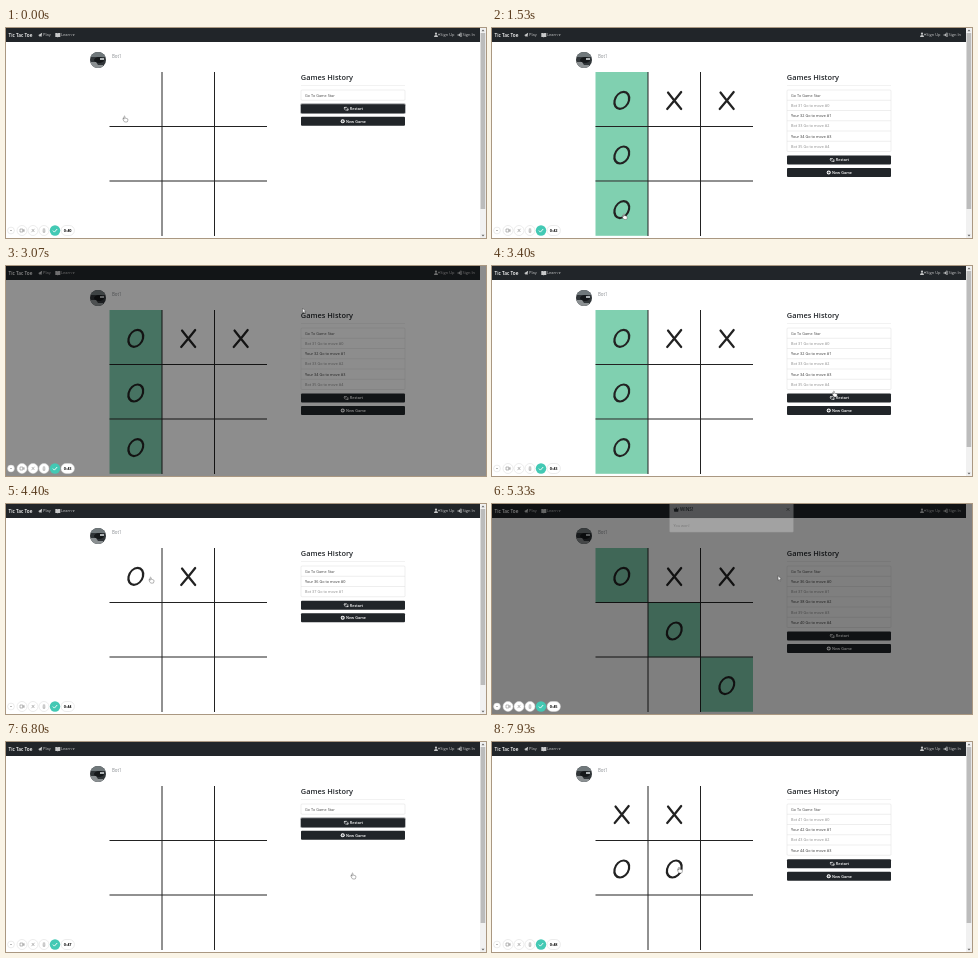
These frames come from a looping animation (480x210 px, 8000 ms). An HTML page:

```html
<!DOCTYPE html>
<html lang="en">
<head>
<meta charset="utf-8">
<title>Tic Tac Toe</title>
<style>
html, body { margin: 0; width: 100%; height: 100%; overflow: hidden; background: #fff; }
svg { display: block; width: 480px; height: 210px; }
text { font: 4px "Open Sans", "Noto Sans", sans-serif; fill: #333; }
.brand { font-size: 4.7px; font-weight: 600; fill: #fff; }
.nav text { fill: #c8c9ca; }
.nav .brand { fill: #fff; }
.title { font-size: 7.4px; font-weight: 600; fill: #212529; }
.btn text { fill: #fff; font-weight: 600; font-size: 3.8px; }
.row text { font-size: 3.8px; }
</style>
</head>
<body>
<svg viewBox="0 0 480 210">
  <rect width="480" height="210" fill="#fff"/>
  <g class="nav">
    <rect width="474" height="14" fill="#212529"/>
    <text class="brand" x="2.5" y="8.8">Tic Tac Toe</text>
    <path d="M32 7.2L36.2 4.8L35.4 9L33.8 8L33.4 9.2L33.1 7.6Z" fill="#c8c9ca"/>
    <text x="37" y="8.4">Play</text>
    <path d="M49.3 5h2l.5.4.5-.4h2v4h-2l-.5.4-.5-.4h-2z" fill="#c8c9ca"/>
    <text x="55" y="8.4">Learn</text>
    <path d="M66.4 6.5h2.4l-1.2 1.3z" fill="#c8c9ca"/>
    <g fill="#c8c9ca">
      <circle cx="430" cy="5.7" r="1.1"/><path d="M428 9q0-2 2-2t2 2zM432 6.2h2v.6h-2zM432.7 5.5h.6v2h-.6z"/>
      <path d="M451.5 6.4h1.7v-1.2l1.8 1.7-1.8 1.7v-1.2h-1.7zM454 4.8h1.5v4.2h-1.5v-.6h.9v-3h-.9z"/>
    </g>
    <text x="434.3" y="8.4">Sign Up</text>
    <text x="456.5" y="8.4">Sign In</text>
  </g>

  <clipPath id="round"><circle cx="92" cy="32" r="8"/></clipPath>
  <g clip-path="url(#round)">
    <rect x="84" y="24" width="16" height="16" fill="#303538"/>
    <rect x="84" y="24" width="16" height="5" fill="#70787b"/>
    <ellipse cx="93" cy="32" rx="5" ry="3" fill="#15181a"/>
    <path d="M85 34h5l2 3h5v3H85z" fill="#8b9092"/>
    <path d="M94 30h4v2h-4z" fill="#aeb3b5"/>
  </g>
  <text x="106" y="29.5" style="font-size:4.4px;fill:#85898d">Bot1</text>

  <g id="cells"></g>
  <path d="M156 44V208M208.5 44V208M103.5 98.5H261M103.5 153H261" stroke="#222" fill="none"/>

  <text class="title" x="294.8" y="51.8">Games History</text>
  <path d="M295 57.5H399" stroke="#ddd" stroke-width=".4"/>
  <rect id="list" x="295" y="62" width="104" fill="#fff" stroke="#d5d5d5" stroke-width=".4" rx="1"/>
  <g id="rows"></g>
  <g id="buttons" class="btn">
    <rect id="focus" x="294.2" y="-.8" width="105.6" height="10.6" rx="1.6" fill="#a6a8aa"/>
    <rect x="295" width="104" height="9" rx="1" fill="#212529"/>
    <path d="M338.7 5.6V3.2H341M341.8 3.6V6H339.4M337.9 4L338.7 3L339.5 4M341 5.2L341.8 6.2L342.6 5.2" fill="none" stroke="#fff" stroke-width=".6"/>
    <text x="343.8" y="6">Restart</text>
    <rect x="295" y="12.6" width="104" height="9" rx="1" fill="#212529"/>
    <circle cx="336.7" cy="17.1" r="2" fill="#fff"/>
    <path d="M335.5 17.1h2.4M336.7 15.9v2.4" stroke="#212529" stroke-width=".6"/>
    <text x="340" y="18.5">New Game</text>
  </g>

  <g id="bar">
    <rect x="474" width="6" height="210" fill="#f1f1f1"/>
    <rect x="474.6" y="5" width="4.6" height="176" fill="#bcbcbc"/>
    <path d="M475.5 3.2h3L477 1.4zM475.5 206.8h3L477 208.6z" fill="#666"/>
  </g>

  <rect id="shade" width="480" height="210"/>
  <g id="modal">
    <rect x="177.5" y="7" width="124" height="31" rx="1" fill="#fff" stroke="#999" stroke-width=".3"/>
    <path d="M177.5 24H301.5" stroke="#ccc" stroke-width=".4"/>
    <path d="M181.7 13.5L183 15L184.2 12.8L185.4 15L186.7 13.5L186.2 17.6H182.2Z" fill="#212529"/>
    <text x="188" y="17.2" style="font-size:4.6px;font-weight:600;fill:#212529">WINS!</text>
    <rect id="ring" x="291.8" y="10.8" width="8.4" height="8.4" rx="1" fill="none" stroke="#b9d3fb" stroke-width=".9"/>
    <path d="M294.6 13.8L297.4 16.6M297.4 13.8L294.6 16.6" stroke="#555" stroke-width=".7"/>
    <text x="181.5" y="32.4" style="font-size:3.8px;fill:#666">You won!</text>
  </g>

  <g id="tools">
    <g fill="#fff" stroke="#d9d9d9" stroke-width=".5">
      <circle cx="5" cy="202.5" r="3.4"/>
      <circle cx="16" cy="202.5" r="5"/><circle cx="27" cy="202.5" r="5"/><circle cx="38" cy="202.5" r="5"/>
      <rect x="55" y="197.5" width="13.4" height="10" rx="5"/>
    </g>
    <circle cx="49" cy="202.5" r="5.2" fill="#43c9b4"/>
    <path d="M46.9 202.6L48.4 204.1L51.2 201" fill="none" stroke="#fff" stroke-width=".9"/>
    <path d="M4 202.5h2M14 201h2.8v3H14zM16.8 202.5l1.4-1v2zM25.5 204.2l3-3.4M25.8 201l2.6 3M36.9 201h2.2M37.2 201.5v2.8h1.6v-2.8" fill="none" stroke="#8a8a8a" stroke-width=".6"/>
    <text id="clock" x="61.7" y="203.9" text-anchor="middle" style="font-size:3.9px;font-weight:700;fill:#111"></text>
  </g>
  <path id="arrow" d="M0 0V4.6L1.1 3.7L1.9 5.3L2.6 5L1.9 3.4H3.3Z" fill="#fff" stroke="#222" stroke-width=".35"/>
  <path id="hand" d="M0 .5Q.5-.4 1 .5V2.3Q1.7 1.8 2 2.5Q2.7 2.1 3 2.8Q3.8 2.6 3.8 3.4V4.7L3.2 6H.6L-.9 3.9Q-1-.1 0 3.2Z" fill="#fff" stroke="#444" stroke-width=".4"/>
</svg>
<script>
const LOOP = 8000;
const NS = "http://www.w3.org/2000/svg";
const $ = id => document.getElementById(id);
const clamp = v => Math.max(0, Math.min(1, v));

function add(parent, tag, attrs) {
  const el = document.createElementNS(NS, tag);
  for (const k in attrs) el.setAttribute(k, attrs[k]);
  return parent.appendChild(el);
}

// Moves are [time, cell]; the player's O always opens.
const games = [
  { start: 0, first: 31, moves: [[430, 0], [590, 1], [1000, 3], [1080, 2], [1400, 6]],
    line: [0, 3, 6], shade: 1740, show: 1890, ring: 2730, hide: 2905 },
  { start: 3730, first: 36, moves: [[4200, 0], [4290, 1], [4640, 4], [4740, 2], [4990, 8]],
    line: [0, 4, 8], shade: 5140, show: 5290, ring: 5870, hide: 6020 },
  { start: 6800, first: 41, moves: [[7260, 3], [7360, 0], [7700, 4], [7790, 1]], line: [] }
];

// Pointer stops: time, x, y
const path = [
  [0, 118, 88], [65, 118, 88], [130, 122, 85], [270, 122, 85], [420, 128, 76], [850, 128, 76],
  [1000, 126, 133], [1130, 126, 133], [1370, 130, 186], [1500, 130, 186], [1930, 249, 121.5],
  [2390, 295, 13], [2910, 295, 13], [3070, 296.5, 42], [3480, 345, 131], [3750, 345, 131],
  [4180, 136, 74], [4400, 144, 73], [4620, 184, 126], [4700, 184, 126], [4960, 236, 180],
  [5050, 236, 180], [5330, 286, 72], [5700, 295, 13], [6030, 295, 13], [6200, 339.5, 110],
  [6460, 346, 131], [6830, 346, 131], [7240, 132, 124], [7450, 132, 124], [7680, 186.5, 125],
  [8000, 186.5, 125]
];

const cells = Array.from({ length: 9 }, (_, i) => {
  const c = i % 3, r = Math.floor(i / 3);
  const g = add($("cells"), "g", { transform: `translate(${103.5 + c * 52.5} ${44 + r * 54.6})` });
  const ink = { fill: "none", stroke: "#222", "stroke-width": 2.2, "stroke-linecap": "round" };
  return {
    bg: add(g, "rect", { width: 52.5, height: 54.6, fill: "#80d0b0" }),
    O: add(g, "ellipse", { ...ink, rx: 7.2, ry: 8.5, transform: "translate(26.3 28.4) skewX(-12)" }),
    X: add(g, "path", { ...ink, d: "M20 20.5Q25 27 33.2 37M33.2 20Q27 28 19.2 37" })
  };
});

const rows = Array.from({ length: 6 }, (_, i) => {
  const g = add($("rows"), "g", { class: "row" });
  const y = 62 + i * 10.25;
  if (i) add(g, "path", { d: `M295 ${y}H399`, stroke: "#d5d5d5", "stroke-width": .4 });
  return { g, label: add(g, "text", { x: 299, y: y + 6.5 }) };
});

const show = (el, on) => el.setAttribute("visibility", on ? "visible" : "hidden");

// Tangent at a stop; zero where the pointer rests on either side.
function slope(i, k) {
  const a = path[i - 1], b = path[i], c = path[i + 1];
  if (!a || !c) return 0;
  const still = (p, q) => p[1] === q[1] && p[2] === q[2];
  return still(a, b) || still(b, c) ? 0 : (c[k] - a[k]) / (c[0] - a[0]);
}

function pointer(t) {
  let i = 0;
  while (i < path.length - 2 && t >= path[i + 1][0]) i++;
  const a = path[i], b = path[i + 1], d = b[0] - a[0], u = (t - a[0]) / d;
  const h = u * u * (3 - 2 * u);
  return [1, 2].map(k => a[k] + (b[k] - a[k]) * h +
    d * (slope(i, k) * u * (1 - u) ** 2 - slope(i + 1, k) * u * u * (1 - u)));
}

// CSS ease-out: cubic-bezier(0, 0, .58, 1)
function easeOut(x) {
  let lo = 0, hi = 1;
  for (let i = 0; i < 16; i++) {
    const s = (lo + hi) / 2;
    if (1.74 * s * s * (1 - s) + s ** 3 < x) lo = s; else hi = s;
  }
  return lo * lo * (3 - 2 * lo);
}

function drawGame(game, t) {
  const done = game.moves.filter(m => t >= m[0]);
  const won = done.length === 5;
  cells.forEach((cell, i) => {
    const n = done.findIndex(m => m[1] === i);
    show(cell.bg, won && game.line.includes(i));
    show(cell.O, n >= 0 && n % 2 === 0);
    show(cell.X, n % 2 === 1);
  });
  const count = done.length + 1;
  rows.forEach((row, i) => {
    show(row.g, i < count);
    const id = game.first + i - 1, mine = id % 2 === 0;
    row.label.textContent = i ? `${mine ? "Your" : "Bot"} ${id} Go to move #${i - 1}` : "Go To Game Star";
    row.label.style.fill = !i ? "#444" : mine ? "#333" : "#888";
  });
  $("list").setAttribute("height", count * 10.25);
  $("buttons").setAttribute("transform", `translate(0 ${65.9 + count * 10.25})`);
  show($("focus"), count === 1);
}

function drawModal(game, t) {
  const { shade, show: open, hide, ring } = game;
  const active = shade !== undefined && t >= shade && t < hide + 300;
  const dim = active ? Math.min(clamp((t - shade) / 150), 1 - clamp((t - hide - 150) / 150)) : 0;
  $("shade").setAttribute("opacity", dim * .5);
  show($("bar"), !active);
  const closing = t >= hide;
  const alpha = !active ? 0 : closing ? 1 - clamp((t - hide) / 150) : clamp((t - open) / 150);
  const lift = closing ? easeOut(clamp((t - hide) / 300)) : 1 - easeOut(clamp((t - open) / 300));
  $("modal").setAttribute("opacity", alpha);
  $("modal").setAttribute("transform", `translate(0 ${active ? -12.5 * lift : 0})`);
  $("ring").setAttribute("opacity", t >= ring ? 1 : 0);
  return active;
}

function render(t) {
  const game = games.filter(g => t >= g.start).pop();
  drawGame(game, t);
  const covered = drawModal(game, t);
  $("clock").textContent = "0:" + (40 + Math.floor((t + 711) / 1031));

  const [x, y] = pointer(t);
  const onBoard = x > 103 && x < 261 && y > 44;
  const onPanel = x > 295 && x < 399 && y > 62 && y < 149;
  const hand = !covered && (onBoard || onPanel);
  for (const id of ["arrow", "hand"]) {
    $(id).setAttribute("transform", `translate(${x} ${y})`);
    show($(id), (id === "hand") === hand);
  }
}

const begin = performance.now();
function tick() {
  render((performance.now() - begin) % LOOP);
  requestAnimationFrame(tick);
}
render(0);
requestAnimationFrame(tick);
</script>
</body>
</html>
```
